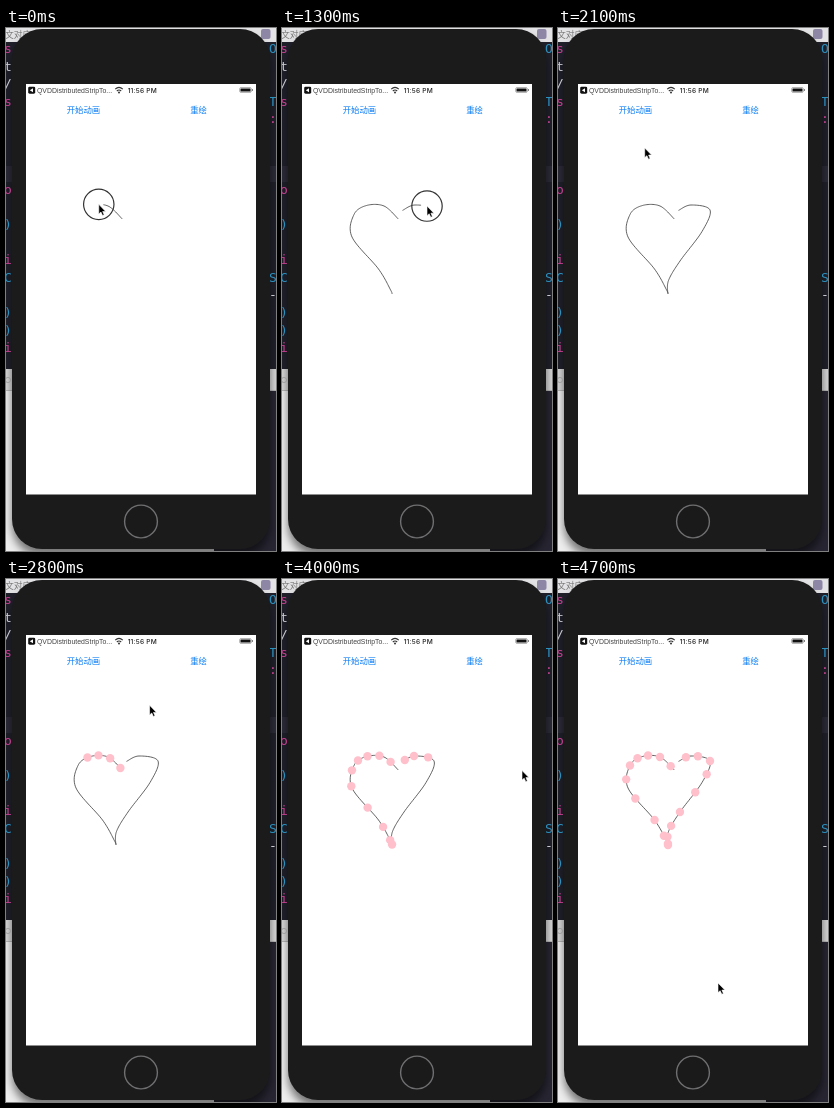
An HTML page that plays this animation: 270 px wide and 523 px high, repeating every 4800 ms.

```html
<!DOCTYPE html>
<html lang="zh">
<head>
<meta charset="utf-8">
<title>Heart path</title>
<style>
  html, body { margin: 0; width: 100%; height: 100%; overflow: hidden; background: #e9e9ea; }
  svg { display: block; width: 270px; height: 523px; }
  .code { font: 13px "DejaVu Sans Mono", monospace; }
  .tab { font: 8.8px "Noto Sans CJK SC", sans-serif; fill: #777; }
  .back { font: 6.9px "Liberation Sans", Arial, sans-serif; fill: #444; }
  .clock { font: 500 6.6px Inter, sans-serif; letter-spacing: .2px; fill: #222; text-anchor: middle; }
  .button { font: 500 8.4px "Noto Sans CJK SC", sans-serif; fill: #0a7cf5; text-anchor: middle; }
  .line { fill: none; stroke: #3a3a3a; stroke-width: .8; stroke-linejoin: round; }
</style>
</head>
<body>
<svg viewBox="0 0 270 523">
  <defs>
    <filter id="soft" x="-20%" y="-20%" width="140%" height="140%"><feGaussianBlur stdDeviation="4"/></filter>
  </defs>

  <!-- desktop behind the phone -->
  <rect width="270" height="523" fill="#ededee"/>
  <rect width="270" height="14" fill="#e3e2e4"/>
  <rect y="14" width="270" height="327" fill="#20202b"/>
  <rect y="138" width="270" height="16" fill="#2b2a37"/>
  <rect y="341" width="270" height="21" fill="#d5d5d6"/>
  <path d="M0 362.5H270" stroke="#b5b5b6"/>
  <rect x="208" y="363" width="62" height="160" fill="#262531"/>
  <rect x="6" y="8" width="258" height="520" rx="30" opacity=".5" filter="url(#soft)"/>
  <text class="tab" x="-1" y="9.5">文对应</text>
  <rect x="255" y="1" width="9.5" height="10" rx="2" fill="#8d86a5"/>
  <circle cx="2" cy="352" r="2.6" fill="none" stroke="#999" stroke-width=".8"/>
  <g class="code" id="code"></g>

  <!-- phone -->
  <rect x="6" y="1" width="258" height="520" rx="30" fill="#1b1b1c"/>
  <circle cx="135" cy="493.5" r="16.4" fill="#1a1a1b" stroke="#707072" stroke-width="1.4"/>
  <rect x="20" y="56" width="230" height="410.5" fill="#fff"/>

  <!-- status bar -->
  <rect x="22.2" y="58.7" width="7" height="7" rx="1.4" fill="#111"/>
  <path d="M27 60.2V64.2L23.8 62.2Z" fill="#fff"/>
  <text class="back" x="31" y="64.7">QVDDistributedStripTo...</text>
  <path d="M109.2 61.2Q113 57.7 116.8 61.2M110.8 63Q113 61 115.2 63" fill="none" stroke="#333" stroke-width="1.1"/>
  <circle cx="113" cy="64.4" r="1" fill="#333"/>
  <text class="clock" x="136.3" y="64.6">11:56 PM</text>
  <rect x="233.7" y="59.6" width="11.6" height="4.8" rx="1.2" fill="#fff" stroke="#777" stroke-width=".6"/>
  <rect x="234.5" y="60.4" width="10" height="3.2" rx=".6" fill="#111"/>
  <rect x="246" y="61" width=".9" height="2" fill="#777"/>

  <text class="button" x="77.5" y="85">开始动画</text>
  <text class="button" x="192.5" y="85">重绘</text>

  <path class="line" id="left"/>
  <path class="line" id="right"/>
  <g id="dots" fill="#ffc0cb"></g>
  <g id="pointer">
    <circle id="ring" r="15.2" fill="none" stroke="#333" stroke-width="1.2"/>
    <path d="M0 0V9.6L2.2 7.7L3.8 11.2L5.4 10.5L3.9 7.1H6.9Z" fill="#000" stroke="#fff" stroke-width=".6"/>
  </g>
</svg>

<script>
const LOOP = 4800, TICK = 100;
const STEP = 1.5;        // beats between key points
const PEN_BEAT = 81;     // ms per beat for the pen
const PEN_LEAD = 0.38;   // beats the pointer runs ahead of the line
const DOT_DELAY = 125, DOT_START = 2412;
const $ = id => document.getElementById(id);
const clamp = (v, a, b) => Math.min(b, Math.max(a, v));

// Key points at equal beats, so their spacing also sets the speed.
const stroke = (from, pts) => ({ from, pts, to: from + (pts.length - 1) * STEP });
const left = stroke(-0.2, [
  [116.3, 191], [102, 178], [84.5, 177.5], [72, 186.5],
  [70, 209], [96.5, 241], [108.6, 262], [110, 266]
]);
const right = stroke(10.3, [
  [120.5, 182.4], [133, 177], [152, 182], [144, 203.5],
  [122, 233], [110.5, 252.5], [109.8, 265.5]
]);

// Catmull-Rom position on a stroke at a given beat
function at({ pts, from }, beat) {
  const last = pts.length - 1;
  const k = clamp((beat - from) / STEP, 0, last);
  const i = Math.min(Math.floor(k), last - 1), f = k - i;
  const p = n => pts[clamp(n, 0, last)];
  return [0, 1].map(c => {
    const a = p(i - 1)[c], b = p(i)[c], d = p(i + 1)[c], e = p(i + 2)[c];
    return b + 0.5 * f * (d - a + f * (2 * a - 5 * b + 4 * d - e + f * (3 * (b - d) + e - a)));
  });
}

function trace(s, beat) {
  const end = Math.min(beat, s.to);
  if (end <= s.from) return "";
  const out = [];
  for (let b = s.from; b < end; b += 0.1) out.push(at(s, b));
  out.push(at(s, end));
  return "M" + out.map(p => p.map(v => v.toFixed(2)).join(" ")).join("L");
}

const leftBeat = t => 1.7 + t / PEN_BEAT;
const rightBeat = t => 12.25 + (t - 1300) / PEN_BEAT;
const LEFT_END = 700, RIGHT_START = 1130, RIGHT_END = 1850;
const BUTTON = [81, 84], REST = [240, 191.5], EXIT = [160, 404];

// Eased pointer travel between two places
function glide(t, start, end, a, b) {
  const f = clamp((t - start) / (end - start), 0, 1), e = f * f * (3 - 2 * f);
  return a.map((v, c) => v + (b[c] - v) * e);
}

function pointerAt(t) {
  if (t <= LEFT_END) return at(left, leftBeat(t) + PEN_LEAD);
  if (t < RIGHT_START) return glide(t, LEFT_END, RIGHT_START, left.pts.at(-1), right.pts[0]);
  if (t <= RIGHT_END) return at(right, rightBeat(t) + PEN_LEAD);
  if (t < 2500) return glide(t, RIGHT_END, 2200, right.pts.at(-1), BUTTON).map((v, c) => v);
  if (t < 4300) return glide(t, 2500, 3200, BUTTON, REST);
  return glide(t, 4300, 4700, REST, EXIT);
}

const within = (t, a, b) => t >= a && t <= b;
const pressed = t => t <= LEFT_END || within(t, RIGHT_START, RIGHT_END) || within(t, 2300, 2400);

function svg(tag, parent, attrs) {
  const el = document.createElementNS("http://www.w3.org/2000/svg", tag);
  for (const k in attrs) el.setAttribute(k, attrs[k]);
  return parent.appendChild(el);
}

// Editor letters that peek out beside the phone, one per line
function column(x, letters) {
  [...letters].forEach((ch, i) => {
    const fill = "soi:".includes(ch) ? "#c2428f" : "t/-".includes(ch) ? "#c9c9d0" : "#2c90bd";
    svg("text", $("code"), { x, y: 25 + 17.6 * i, fill }).textContent = ch;
  });
}
column(-2, "st/s    o ) iC ))i");
column(263, "O  T:        S-");

const dots = Array.from({ length: 20 }, () => svg("circle", $("dots"), { r: 4.2 }));

function draw(t) {
  $("left").setAttribute("d", trace(left, leftBeat(t)));
  $("right").setAttribute("d", trace(right, rightBeat(t)));
  dots.forEach((dot, k) => {
    const beat = (t - DOT_START) / DOT_DELAY - k;
    const [cx, cy] = at(beat < 10.5 ? left : right, beat);
    dot.setAttribute("cx", cx);
    dot.setAttribute("cy", cy);
    dot.style.display = beat >= left.from ? "" : "none";
  });
  $("pointer").setAttribute("transform", `translate(${pointerAt(t)})`);
  $("ring").style.display = pressed(t) ? "" : "none";
}

const start = performance.now();
function frame() {
  const t = (performance.now() - start) % LOOP;
  draw(Math.floor(t / TICK) * TICK);
  requestAnimationFrame(frame);
}
frame();
</script>
</body>
</html>
```
